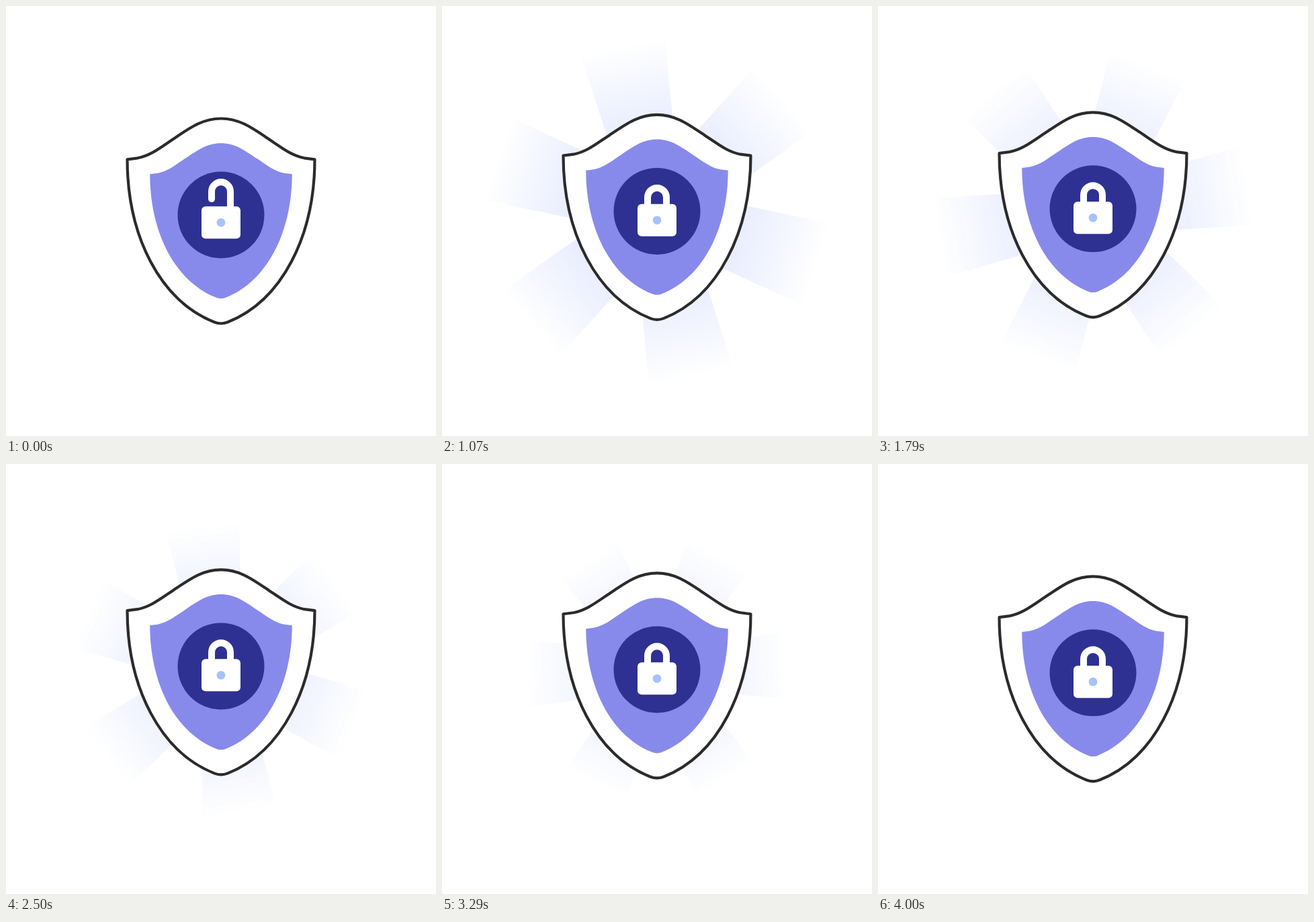
An HTML page for the animation above (4.07 s loop, 640 by 640 pixels).

```html
<!DOCTYPE html>
<html lang="en">
<head>
<meta charset="utf-8">
<title>Shield lock</title>
<style>
  html, body { margin: 0; width: 100%; height: 100%; overflow: hidden; background: #fff; }
  svg { display: block; width: 100%; height: 100%; }
</style>
</head>
<body>
<svg viewBox="0 0 640 640">
  <defs>
    <linearGradient id="fade" gradientUnits="userSpaceOnUse" x1="0" y1="0" x2="252" y2="0">
      <stop offset="0" stop-color="#a6b9fc" stop-opacity=".5"/>
      <stop offset="1" stop-color="#a6b9fc" stop-opacity="0"/>
    </linearGradient>
    <path id="ray" d="M0-36 L252-64.5 V64.5 L0 36Z" fill="url(#fade)"/>
    <path id="crest" d="M320 167.5 C347 167.5 365 180.5 391 198 C412 212 425 222.5 444 226.3 L459.5 228.3
      C459.5 342.5 410.5 438.5 330 470.5 C323 473.3 317 473.3 310 470.5
      C229.5 438.5 180.5 342.5 180.5 228.3 L196 226.3 C215 222.5 228 212 249 198 C275 180.5 293 167.5 320 167.5Z"/>
  </defs>
  <g id="rays"></g>
  <g id="shield">
    <use href="#crest" fill="#fff" stroke="#2b2b2b" stroke-width="4.2" stroke-linejoin="round"/>
    <use href="#crest" fill="#888aeb" transform="translate(77.44 77.2) scale(.758)"/>
    <circle cx="320" cy="311" r="64.5" fill="#2e3192"/>
    <g id="lock">
      <path id="shackle" d="M306 301.4 V290.4 A14 14 0 0 1 334 290.4 V320"
        fill="none" stroke="#fff" stroke-width="10" stroke-linecap="round"/>
      <rect x="291" y="300.4" width="58" height="48" rx="6" fill="#fff"/>
      <circle cx="320" cy="324.4" r="6.4" fill="#a8c1fd"/>
    </g>
  </g>
</svg>
<script>
const LOOP = 4070, STEP = 1000 / 14;
const $ = id => document.getElementById(id);
const rays = $('rays'), shield = $('shield'), lock = $('lock'), shackle = $('shackle');

const spokes = Array.from({ length: 6 }, () => {
  const use = document.createElementNS('http://www.w3.org/2000/svg', 'use');
  use.setAttribute('href', '#ray');
  return rays.appendChild(use);
});

// [time, height] of the floating shield
const BOB = [[0, 0], [500, -2.2], [1070, -5.6], [1790, -9.2], [2250, -10.4],
  [2500, -10.1], [2860, -8.1], [3290, -5], [4000, -.2], [4071, 0]];

const clamp = x => Math.min(1, Math.max(0, x));
const span = (t, from, to) => clamp((t - from) / (to - from));
const easeOut = x => 1 - (1 - x) ** 3;
const easeInOut = x => x * x * (3 - 2 * x);

// Smooth curve through the key points
function curve(keys, t) {
  const last = keys.length - 1;
  let i = 0;
  while (i < last - 1 && t >= keys[i + 1][0]) i++;
  const slope = k => {
    const a = keys[Math.max(0, k - 1)], b = keys[Math.min(last, k + 1)];
    return (b[1] - a[1]) / (b[0] - a[0]);
  };
  const [t0, y0] = keys[i], [t1, y1] = keys[i + 1];
  const d = t1 - t0, u = clamp((t - t0) / d), v = 1 - u;
  return y0 * v * v * (1 + 2 * u) + y1 * u * u * (3 - 2 * u)
    + d * u * v * (slope(i) * v - slope(i + 1) * u);
}

const move = (el, y) => el.setAttribute('transform', `translate(0 ${y.toFixed(3)})`);

function draw(t) {
  move(shield, curve(BOB, t));

  const open = 1 - easeInOut(span(t, 600, 860));
  move(lock, -2.1 * open);
  move(shackle, -12.2 * open);

  const grow = .3 + .7 * easeOut(span(t, 640, 1000));
  const size = grow * (1 - (t - 1070) * .000104);
  const dim = (1 - .3 * span(t, 1070, 3290)) * (1 - span(t, 3290, 3990));
  rays.setAttribute('opacity', span(t, 640, 860) * dim);
  spokes.forEach((el, i) => el.setAttribute('transform',
    `translate(320 306) rotate(${-30 + t * .0451 + i * 60}) scale(${size})`));
}

function tick() {
  const t = performance.now() % LOOP;
  draw(Math.floor((t + 6) / STEP) * STEP % (57 * STEP));
  requestAnimationFrame(tick);
}
tick();
</script>
</body>
</html>
```
